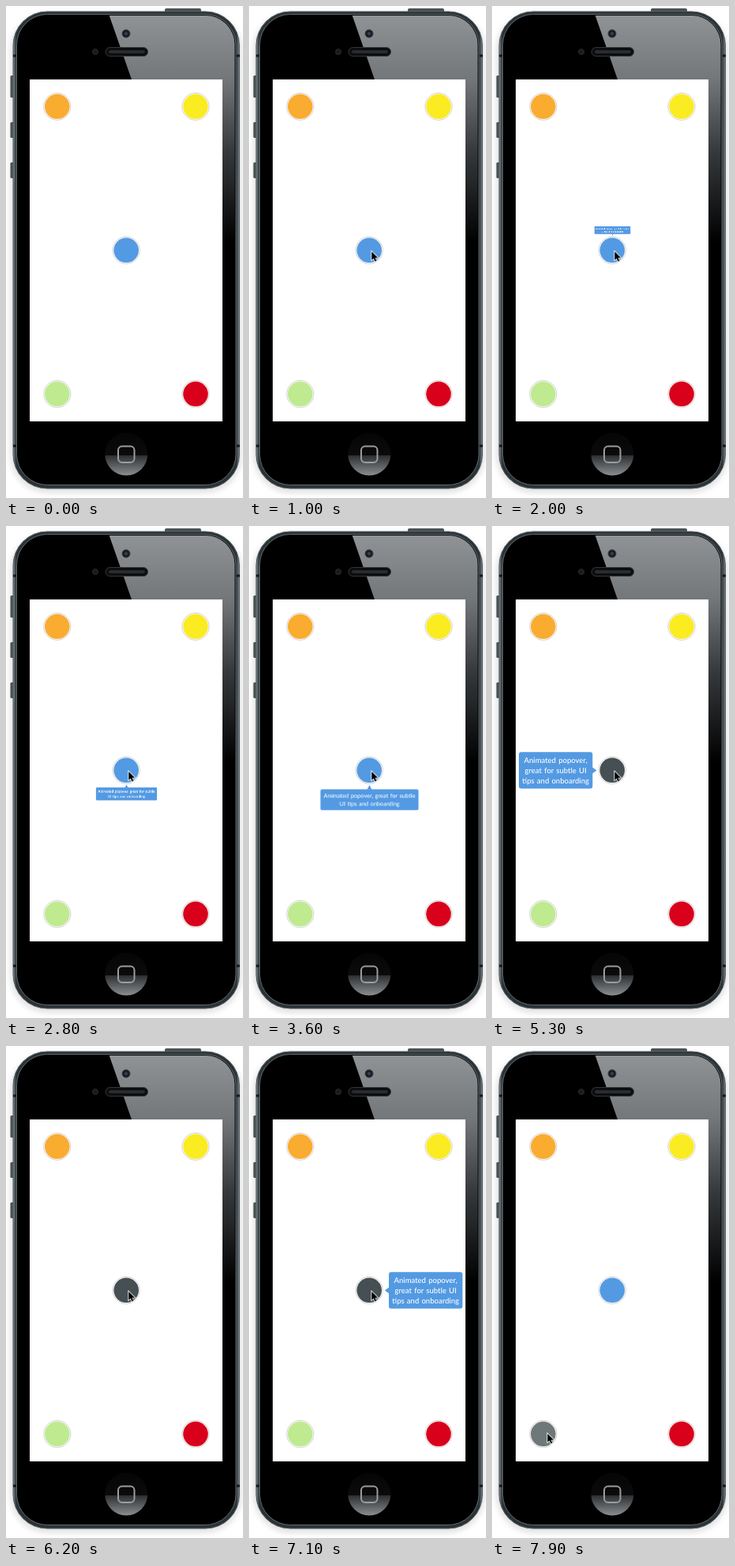
An HTML page for the animation above (8 s loop, 300x623 px).

```html
<!DOCTYPE html>
<html lang="en">
<head>
<meta charset="utf-8">
<title>Popover demo</title>
<style>
  html, body { margin: 0; width: 100%; height: 100%; overflow: hidden; background: #fff; }
  svg { display: block; }

  .ring { fill: #fff; stroke: #c4c4c4; stroke-width: .8; }
  .tip { fill: #539ae3; transform: scale(0); }
  .tip text {
    font: 500 9.5px Lato, "Open Sans", sans-serif; word-spacing: .8px;
    fill: #fff; text-anchor: middle; text-rendering: geometricPrecision;
  }

  /* One loop is 8 s, so 1.25% is 100 ms. */
  .tip, #cursor, #blue, #green { animation: 8s linear infinite; }
  #up    { animation-name: up;    transform-origin: 152.5px 291px; }
  #down  { animation-name: down;  transform-origin: 152.5px 327px; }
  #left  { animation-name: left;  transform-origin: 133px 309.5px; }
  #right { animation-name: right; transform-origin: 171px 309.5px; }
  #blue  { animation-name: pressBlue; animation-timing-function: step-end; }
  #green { animation-name: pressGreen; animation-timing-function: step-end; }
  #cursor { animation-name: point; }

  @keyframes up {
    0%, 13.1% { transform: scale(0); animation-timing-function: ease-out; }
    15% { transform: scale(1); }
    23.3% { transform: scale(1); animation-timing-function: ease-in; }
    25.4%, 100% { transform: scale(0); }
  }
  @keyframes down {
    0%, 34.4% { transform: scale(0); animation-timing-function: ease-out; }
    36.25% { transform: scale(1); }
    44.17% { transform: scale(1); animation-timing-function: ease-in; }
    46.25%, 100% { transform: scale(0); }
  }
  @keyframes left {
    0%, 56.9% { transform: scale(0); animation-timing-function: ease-out; }
    58.75% { transform: scale(1); }
    66.7% { transform: scale(1); animation-timing-function: ease-in; }
    68.75%, 100% { transform: scale(0); }
  }
  @keyframes right {
    0%, 81.9% { transform: scale(0); animation-timing-function: ease-out; }
    83.75% { transform: scale(1); }
    89.2% { transform: scale(1); animation-timing-function: ease-in; }
    91.25%, 100% { transform: scale(0); }
  }
  @keyframes pressBlue {
    0%, 12%, 23.3%, 33.75%, 44.2%, 56.25%, 67.3%, 81.25%, 89.8%, 100% { fill: #539ae3; }
    10%, 22.4%, 29.9%, 43.6%, 53.6%, 66.1%, 77.4%, 88.6% { fill: #454f54; }
  }
  @keyframes pressGreen {
    0%, 100% { fill: #bfea90; }
    98.6% { fill: #6f7879; }
  }
  @keyframes point {
    0%, 2.49% { transform: translate(266px, 588px); opacity: 0; }
    2.5% { transform: translate(266px, 588px); opacity: 1; animation-timing-function: ease-in-out; }
    8.75% { transform: translate(155.3px, 311px); }
    91.25% { transform: translate(155.3px, 311px); animation-timing-function: ease-in-out; }
    97.5%, 100% { transform: translate(70.3px, 491px); opacity: 1; }
  }
</style>
</head>
<body>
<svg width="300" height="623" viewBox="0 0 300 623">
  <defs>
    <linearGradient id="metal">
      <stop offset="0" stop-color="#7d868b"/>
      <stop offset=".014" stop-color="#2a3236"/>
      <stop offset=".986" stop-color="#2a3236"/>
      <stop offset="1" stop-color="#7d868b"/>
    </linearGradient>
    <linearGradient id="glare" gradientUnits="userSpaceOnUse" x1="0" y1="12" x2="0" y2="300">
      <stop offset="0" stop-color="#8f9396"/>
      <stop offset=".28" stop-color="#73777a"/>
      <stop offset=".6" stop-color="#36393c"/>
      <stop offset="1" stop-color="#000"/>
    </linearGradient>
    <linearGradient id="dish" x1="0" y1="0" x2="0" y2="1">
      <stop offset="0" stop-color="#050505"/>
      <stop offset=".52" stop-color="#0b0b0c"/>
      <stop offset=".53" stop-color="#2c2e30"/>
      <stop offset="1" stop-color="#8a8e91"/>
    </linearGradient>
    <filter id="soft"><feGaussianBlur stdDeviation="3"/></filter>
    <clipPath id="face"><rect x="15" y="12" width="274.5" height="593" rx="37"/></clipPath>
  </defs>

  <!-- phone -->
  <rect x="5" y="8" width="294" height="609" rx="48" fill="#e4e4e4" filter="url(#soft)"/>
  <rect x="201" y="3" width="46" height="7" rx="2" fill="#4a5255"/>
  <g fill="#4a5255">
    <rect x="5.5" y="88" width="5" height="28" rx="1.5"/>
    <rect x="5.5" y="147" width="5" height="20" rx="1.5"/>
    <rect x="5.5" y="198" width="5" height="20" rx="1.5"/>
  </g>
  <rect x="9" y="7" width="286.5" height="604" rx="43" fill="url(#metal)" stroke="#596267"/>
  <path d="M9 63h5M9 557h5M291 63h5M291 557h5" stroke="#15191b" stroke-width="3"/>
  <rect x="13.5" y="10.5" width="277.5" height="596" rx="39" fill="#000" stroke="#626c72"/>
  <path d="M130 10L159 93H274V300H290V10Z" fill="url(#glare)" clip-path="url(#face)"/>
  <circle cx="152" cy="35" r="5" fill="#1c1d20" stroke="#3c3e43"/>
  <circle cx="152" cy="35" r="2" fill="#37405a"/>
  <circle cx="113" cy="58" r="3.5" fill="#1b1b1d" stroke="#2b2b2e"/>
  <rect x="126" y="52.5" width="53.5" height="11" rx="5.5" fill="#0c0d0e" stroke="#34373a"/>
  <rect x="130" y="56" width="46" height="4" rx="2" fill="#292b2e"/>
  <circle cx="152.3" cy="567.5" r="27" fill="url(#dish)"/>
  <rect x="142" y="557.5" width="20.5" height="20.5" rx="5" fill="none" stroke="#9a9da0" stroke-width="2"/>
  <rect x="30" y="93" width="244" height="433" fill="#fff"/>

  <!-- buttons -->
  <g class="ring">
    <circle cx="64.8" cy="127.3" r="17.1"/>
    <circle cx="240" cy="127.3" r="17.1"/>
    <circle cx="152.2" cy="309.3" r="17.1"/>
    <circle cx="64.8" cy="491.3" r="17.1"/>
    <circle cx="240" cy="491.3" r="17.1"/>
  </g>
  <circle cx="64.8" cy="127.3" r="15.8" fill="#f9ac2f"/>
  <circle cx="240" cy="127.3" r="15.8" fill="#fbeb21"/>
  <circle id="blue" cx="152.2" cy="309.3" r="15.8" fill="#539ae3"/>
  <circle id="green" cx="64.8" cy="491.3" r="15.8" fill="#bfea90"/>
  <circle cx="240" cy="491.3" r="15.8" fill="#d9001b"/>

  <!-- popovers -->
  <g id="up" class="tip">
    <rect x="73" y="249" width="159" height="33.7" rx="3"/>
    <path d="M148.5 282.5L152.5 289.5L156.5 282.5Z"/>
    <text y="262.8"><tspan x="152.5">Animated popover, great for subtle</tspan><tspan x="152.5" dy="12.8">UI tips and onboarding</tspan></text>
  </g>
  <g id="down" class="tip">
    <rect x="73" y="335.3" width="159" height="33.7" rx="3"/>
    <path d="M148.5 335.5L152.5 328.5L156.5 335.5Z"/>
    <text y="349.2"><tspan x="152.5">Animated popover, great for subtle</tspan><tspan x="152.5" dy="12.8">UI tips and onboarding</tspan></text>
  </g>
  <g id="left" class="tip">
    <rect x="34" y="286.3" width="93.3" height="46.3" rx="3"/>
    <path d="M127 305.5L132.5 309.5L127 313.5Z"/>
    <text y="300"><tspan x="80.6">Animated popover,</tspan><tspan x="80.6" dy="12.8">great for subtle UI</tspan><tspan x="80.6" dy="12.8">tips and onboarding</tspan></text>
  </g>
  <g id="right" class="tip">
    <rect x="177" y="286.3" width="93.3" height="46.3" rx="3"/>
    <path d="M177.3 305.5L171.8 309.5L177.3 313.5Z"/>
    <text y="300"><tspan x="223.6">Animated popover,</tspan><tspan x="223.6" dy="12.8">great for subtle UI</tspan><tspan x="223.6" dy="12.8">tips and onboarding</tspan></text>
  </g>

  <path id="cursor" d="M0 0V10.8L2.5 8.5L4.2 12.6L6.1 11.8L4.4 7.8H7.8Z" fill="#000" stroke="#fff" stroke-width="1.6" paint-order="stroke"/>
</svg>
</body>
</html>
```
